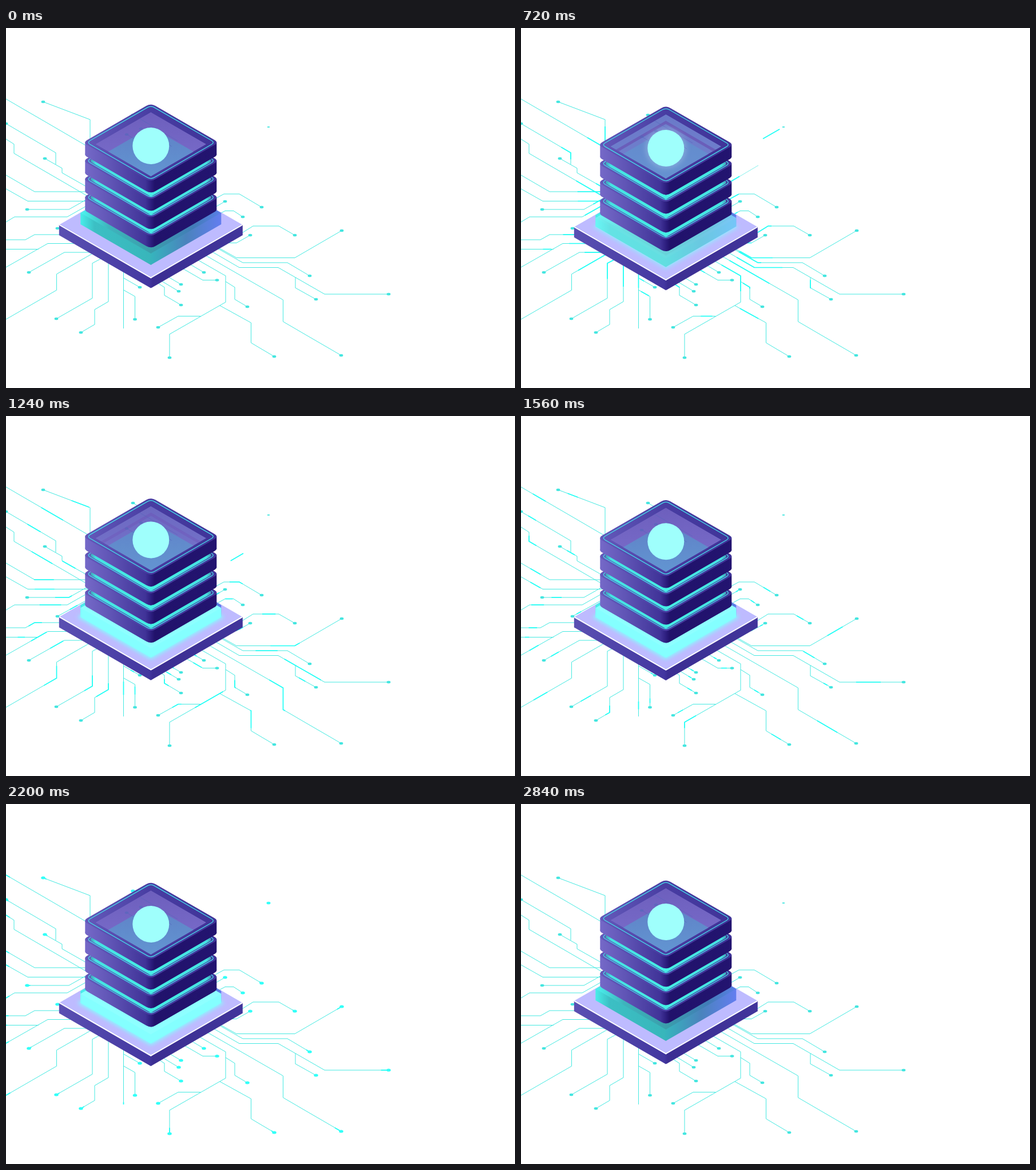
An HTML page that plays this animation: 890x629 px, repeating every 2880 ms.

```html
<!DOCTYPE html>
<html lang="en">
<head>
<meta charset="utf-8">
<title>Server stack</title>
<style>
html, body { margin: 0; width: 100%; height: 100%; overflow: hidden; background: #fff; }
svg { display: block; width: 100%; height: 100%; }
</style>
</head>
<body>
<svg id="stage" viewBox="0 0 890 629" xmlns="http://www.w3.org/2000/svg">
  <defs>
    <filter id="soft" x="-20%" y="-20%" width="140%" height="140%"><feGaussianBlur stdDeviation="3.5"/></filter>
    <filter id="halo" x="-40%" y="-40%" width="180%" height="180%"><feGaussianBlur stdDeviation="4.5"/></filter>
  </defs>
  <g id="wires" fill="none" stroke="#45e9e1"></g>
  <g id="pulses" fill="none" stroke="#1ffff6" stroke-width="1.7"></g>
  <g id="dots"></g>
  <g id="base"></g>
  <g id="stack"></g>
</svg>
<script>
const LOOP = 2880, STEP = 40, CX = 253.3, SLOPE = 0.577;
const $ = id => document.getElementById(id);

function add(parent, tag, attrs) {
  const el = document.createElementNS('http://www.w3.org/2000/svg', tag);
  for (const key in attrs) el.setAttribute(key, attrs[key]);
  parent.appendChild(el);
  return el;
}

function gradient(id, x1, x2, stops, vertical) {
  const axis = vertical ? { x1: 0, x2: 0, y1: x1, y2: x2 } : { x1, x2, y1: 0, y2: 0 };
  const g = add(document.querySelector('defs'), 'linearGradient', { id, gradientUnits: 'userSpaceOnUse', ...axis });
  stops.forEach(([offset, color]) => add(g, 'stop', { offset, 'stop-color': color }));
}

// Isometric square of half width w, its corners cut by c
function diamond(w, cy, c = 0) {
  const h = w * SLOPE, d = c * SLOPE, x = CX, y = cy;
  return `M${x - c},${y - h + d}Q${x},${y - h} ${x + c},${y - h + d}` +
    `L${x + w - c},${y - d}Q${x + w},${y} ${x + w - c},${y + d}` +
    `L${x + c},${y + h - d}Q${x},${y + h} ${x - c},${y + h - d}` +
    `L${x - w + c},${y + d}Q${x - w},${y} ${x - w + c},${y - d}Z`;
}

// Front V of a diamond
const frontEdge = (w, cy) => `M${CX - w},${cy}L${CX},${cy + w * SLOPE}L${CX + w},${cy}`;

function slab(parent, w, cy, depth, c, side, top) {
  const half = w - c / 2;
  add(parent, 'path', { d: diamond(w, cy + depth, c), fill: side });
  add(parent, 'rect', { x: CX - half, y: cy, width: 2 * half, height: depth, fill: side });
  return add(parent, 'path', { d: diamond(w, cy, c), fill: top });
}

// Smooth curve through [time, value] keys, flat at ends and turning points
function curve(keys, t) {
  const last = keys.length - 1;
  if (t <= keys[0][0]) return keys[0][1];
  if (t >= keys[last][0]) return keys[last][1];
  const rate = i => (keys[i + 1][1] - keys[i][1]) / (keys[i + 1][0] - keys[i][0]);
  const tangent = i => {
    if (i === 0 || i === last) return 0;
    const a = rate(i - 1), b = rate(i);
    return a * b <= 0 ? 0 : 2 * a * b / (a + b);
  };
  let i = 0;
  while (t > keys[i + 1][0]) i++;
  const span = keys[i + 1][0] - keys[i][0], u = (t - keys[i][0]) / span, v = 1 - u;
  return keys[i][1] * v * v * (1 + 2 * u) + keys[i + 1][1] * u * u * (3 - 2 * u) +
    span * u * v * (tangent(i) * v - tangent(i + 1) * u);
}

// Wires run outward; "*" marks those that end in a dot
const wires = `M172,224L0,124
*M147,220V160L65,129
*M165,291L98,253V245L68,228
*M87,238V218L0,167
M150,298L14,219V203L0,194
M150,286H50L0,257
M150,302.5H38L0,281
*M165,286L110,317H37
M160,300L107,330H15L0,339
*M150,317L90,350
M110,361H50L34,370H0
M130,376.5H73L0,418
M57,386.5H0
*M150,392H102L40,427
M160,389L88.500,430V458L0,509
*M172,400L151,411V472L88,508
*M179,400V478L155,492V518L131,532
M205.500,420V525
*M206,437L234,453
*M206,458L225.500,469V509
*M270,427L306,448
*M265,438L302,460
*M258,441L277,453V467L306,484
*M310,406L346,427
*M300,415L344,440.500H369
*M384,443L400,453V474L422,487
*M335,405L384,433V479L286,535V576
*M340,503.500H301L266,523
*M374,485L428.500,515V550L469,574
*M345,395L484.500,475V513L586,572
*M357,389L408,418.500H476L557,465H669
*M506,436V454L542,474
*M370,385L414,410H492L531,433
*M368,382L403,401.500H505L587,354
*M390,375.500H403L427,362
*M408,361L432,346H477L505,362
*M362,331L383,319.500H398L414,330
*M355,319L383,303
*M350,307L381,290H408L447,313
*M300,198L222,152`.split('\n');

const pulses = [], dots = [];
const addPulse = d => pulses.push(add($('pulses'), 'path', { d, pathLength: 1 }));

for (const wire of wires) {
  const d = wire.replace('*', '');
  const line = add($('wires'), 'path', { d });
  addPulse(d);
  if (wire[0] !== '*') continue;
  const end = line.getPointAtLength(line.getTotalLength());
  dots.push(add($('dots'), 'ellipse', { cx: end.x, cy: end.y, rx: 3.4, ry: 2.2 }));
}

// This wire shows only while its pulse passes
addPulse('M345,281L415,240M415,198L459,173');
const faint = add($('wires'), 'path', { d: 'M366,269L415,240' });
const farDot = add($('dots'), 'ellipse', { cx: 459, cy: 173 });

gradient('slabSide', 138, 368, [[0, '#7569c8'], [.2, '#5f54b5'], [.46, '#403398'], [.5, '#2e1f80'], [.53, '#21126b'], [1, '#231470']]);
gradient('slabTop', 138, 368, [[0, '#6459ba'], [.5, '#483da2'], [1, '#403398']]);
gradient('baseSide', 93, 414, [[0, '#5a50b2'], [.49, '#4337a0'], [.51, '#3b2e92'], [1, '#41359b']]);
gradient('traySide', 130, 377, [[0, '#48eeea'], [.1, '#3cbfc4'], [.49, '#38b6bb'], [.51, '#37b2bd'], [.75, '#4a83bd'], [1, '#637df0']]);
gradient('trayTop', 130, 377, [[0, '#4cf4f0'], [.2, '#3eb4bd'], [.5, '#3a9fab'], [.8, '#427cb8'], [1, '#5a7fe8']]);
gradient('band', 146, 361, [[0, '#3f8fae'], [.05, '#45e3e2'], [.5, '#45efe5'], [.95, '#45e3e2'], [1, '#3f8fae']]);
gradient('well', 147, 235, [[0, '#6d5fbd'], [1, '#786bc9']], true);
gradient('floor', 172, 262, [[0, '#5f80c6'], [1, '#6296d2']], true);

const base = $('base');
slab(base, 160.5, 344, 18, 0, 'url(#baseSide)', '#bebbff');
add(base, 'path', { d: frontEdge(160, 344), fill: 'none', stroke: '#fff', 'stroke-width': 2 });
slab(base, 123, 323, 20, 0, 'url(#traySide)', 'url(#trayTop)');
const glow = add(base, 'g', {});
add(glow, 'path', { d: diamond(128, 344), fill: '#86fbff', filter: 'url(#soft)' });
slab(glow, 123, 328, 16, 0, '#84ffff', '#8effff');

const stack = $('stack'), layers = [];
for (let i = 3; i >= 0; i--) {
  const g = layers[i] = add(stack, 'g', {}), y = 200 + 32 * i;
  slab(g, 119, y, 21, 8, 'url(#slabSide)', 'url(#slabTop)');
  add(g, 'path', { d: diamond(112, y, 6), fill: 'none', stroke: '#45dcea', 'stroke-width': 1.3 });
  if (i) add(g, 'path', { d: frontEdge(102, y), fill: 'none', stroke: 'url(#band)', 'stroke-width': 6.5, 'stroke-linecap': 'round', 'stroke-linejoin': 'round' });
}

// Glass well of the top layer
const top0 = layers[0];
const clip = add(document.querySelector('defs'), 'clipPath', { id: 'hole' });
add(clip, 'path', { d: diamond(97, 203) });
const well = add(top0, 'g', { 'clip-path': 'url(#hole)' });
add(well, 'path', { d: diamond(97, 203), fill: 'url(#well)' });
add(well, 'path', { d: diamond(78, 218), fill: 'url(#floor)' });
const sheen = add(well, 'g', {});
add(sheen, 'path', { d: diamond(97, 203), fill: '#6890d2', opacity: .55 });
add(sheen, 'path', { d: `M${CX - 95},216L${CX},161L${CX + 95},216`, fill: 'none', stroke: '#6a55b4', 'stroke-width': 5, opacity: .75 });
const seen = add(well, 'g', { fill: '#5468bb', stroke: '#5468bb', opacity: .6 });
add(seen, 'path', { d: 'M233,158L300,197M211,186L265,217M236,176L290,207', fill: 'none' });
add(seen, 'ellipse', { cx: 211, cy: 186, rx: 3, ry: 1.7 });
add(seen, 'ellipse', { cx: 236, cy: 176, rx: 3, ry: 1.7 });

const halo = add(top0, 'circle', { cx: CX, cy: 206, r: 36, fill: '#e2faff', filter: 'url(#halo)' });
add(top0, 'circle', { cx: CX, cy: 206, r: 32, fill: '#9ffffc' });

const topKeys = [[0, 0], [440, .12], [1000, .53], [1520, 1], [1880, .74], [2200, .3], [2840, 0]];
const headKeys = [[80, 0], [440, .2], [1000, .46], [1560, .88], [1880, 1]];
const tailKeys = [[400, 0], [1000, .2], [1560, .75], [1880, .89], [2200, .96], [2600, 1]];
const glowKeys = [[440, 0], [960, 1], [2240, 1], [2800, 0]];
const sheenKeys = [[80, 0], [440, 1], [1000, 1], [1400, 0]];
const haloKeys = [[120, 0], [440, 1], [840, 0]];
const litKeys = [[1600, 0], [2000, 1], [2300, 1], [2760, 0]];
const faintKeys = [[240, 0], [440, .5], [1000, .7], [1240, 0]];

const move = (el, y) => el.setAttribute('transform', `translate(0 ${y.toFixed(2)})`);

function draw(t) {
  const wave = (1 - Math.cos(2 * Math.PI * t / LOOP)) / 2;
  const lag = curve(topKeys, t);
  move(base, 7.5 * wave);
  layers.forEach((g, i) => move(g, 13.3 * (lag + (wave - lag) * i / 3)));

  glow.setAttribute('opacity', curve(glowKeys, t));
  sheen.setAttribute('opacity', curve(sheenKeys, t));
  halo.setAttribute('opacity', curve(haloKeys, t));
  faint.setAttribute('opacity', curve(faintKeys, t));

  const head = curve(headKeys, t), tail = curve(tailKeys, t), size = head - tail;
  $('pulses').setAttribute('visibility', size > .002 ? 'visible' : 'hidden');
  for (const p of pulses) {
    p.setAttribute('stroke-dasharray', `${size} 2`);
    p.setAttribute('stroke-dashoffset', -tail);
  }

  const lit = curve(litKeys, t), mix = (a, b) => Math.round(a + (b - a) * lit);
  $('dots').setAttribute('fill', `rgb(${mix(69, 51)},${mix(230, 255)},${mix(224, 248)})`);
  for (const dot of dots) {
    dot.setAttribute('rx', 3.4 + .4 * lit);
    dot.setAttribute('ry', 2.2 + .3 * lit);
  }
  farDot.setAttribute('rx', 2.5 + lit);
  farDot.setAttribute('ry', 1.1 + 1.2 * lit);
}

const start = performance.now();
function tick() {
  const t = (performance.now() - start) % LOOP;
  draw(Math.floor(t / STEP) * STEP);
  requestAnimationFrame(tick);
}
draw(0);
tick();
</script>
</body>
</html>
```
